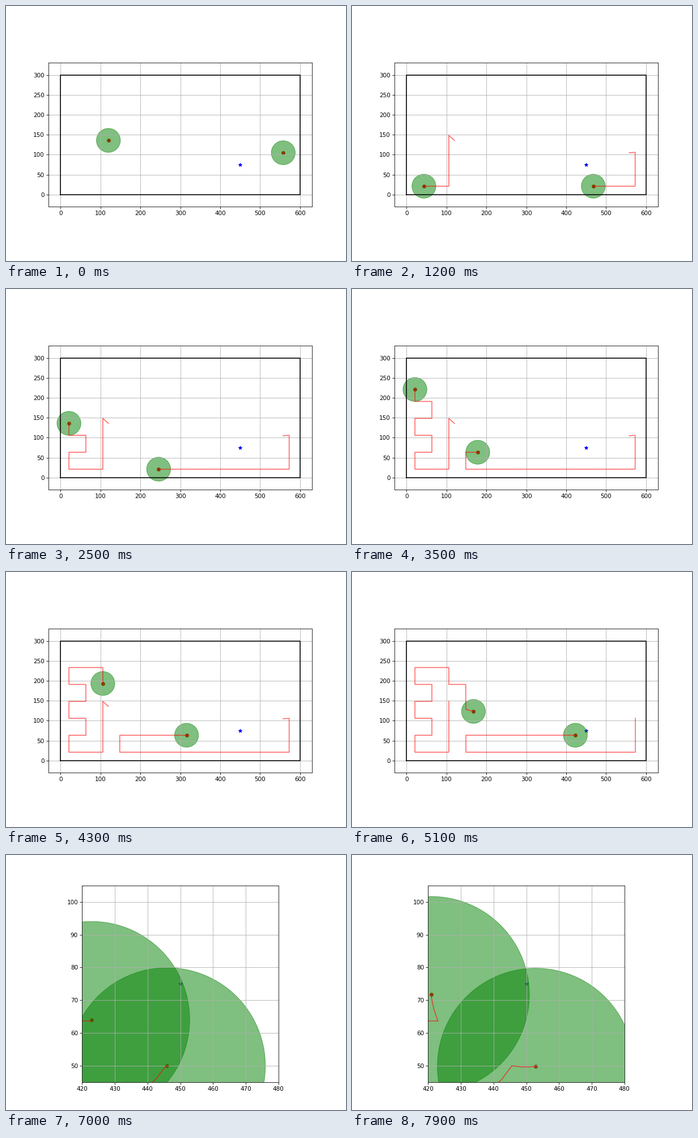
A matplotlib script for the animation above (8000 ms loop, 600 by 450 pixels).

```python
import numpy as np
import matplotlib.pyplot as plt
from matplotlib.animation import FuncAnimation
from matplotlib.patches import Circle

FRAMES, INTERVAL = 80, 100
RADIUS, STEP, TRAIL = 30, 10, 100
CELL = RADIUS * np.sqrt(2)
STAR = np.array([450.0, 75.0])
FOUND = 99        # step at which the star is sensed
ORBIT = 138       # step at which both robots start to spread around it
ZOOM_FRAME = 70
SPIN = 0.015      # radians per step


def center(i, j):
    return np.array([(i + 0.5) * CELL, (j + 0.5) * CELL])


def move_to(path, goal):
    """Append fixed-length steps, the last one cut at the goal."""
    while np.hypot(*(goal - path[-1])) > 1e-6:
        gap = goal - path[-1]
        dist = np.hypot(*gap)
        path.append(goal.copy() if dist <= STEP else path[-1] + gap / dist * STEP)


def sweep(start, corners):
    """Visit the cells one by one along the corners until the star is found."""
    path = [np.array(start, float)]
    i, j = corners[0]
    move_to(path, center(i, j))
    for ci, cj in corners[1:]:
        while (i, j) != (ci, cj):
            i += np.sign(ci - i)
            j += np.sign(cj - j)
            move_to(path, center(i, j))
    return path[:FOUND + 1]


def orbit(path, direction, last):
    """Rotate around the star."""
    x, y = path[-1] - STAR
    r, a = np.hypot(x, y), np.arctan2(y, x)
    for k in range(1, last - len(path) + 2):
        b = a + direction * SPIN * k
        path.append(STAR + r * np.array([np.cos(b), np.sin(b)]))


def approach(path, other):
    """Head straight in, then go round the waiting robot."""
    r, a0, a1 = 26.4, np.radians(182), np.radians(328.8)

    def ring(a):
        return other + r * np.array([np.cos(a), np.sin(a)])

    start, entry = path[-1], ring(a0)
    dist = np.hypot(*(entry - start))
    straight = int(dist // STEP)
    for k in range(1, straight + 1):
        path.append(start + (entry - start) * k * STEP / dist)
    n = ORBIT - len(path) + 1
    for a in np.linspace(a0, a1, n):
        path.append(ring(a))


LAST = 2 * FRAMES
left = sweep((120, 136), [(2, 3), (2, 0), (0, 0), (0, 1), (1, 1), (1, 2), (0, 2),
                          (0, 3), (1, 3), (1, 4), (0, 4), (0, 5), (2, 5), (2, 4),
                          (3, 4), (3, 2)])
right = sweep((558, 105), [(13, 2), (13, 0), (3, 0), (3, 1), (13, 1)])
approach(left, right[-1])
right += [right[-1]] * (ORBIT + 1 - len(right))
orbit(left, 1, LAST)
orbit(right, -1, LAST)
paths = [np.array(left), np.array(right)]

fig, ax = plt.subplots(figsize=(8, 6), dpi=75)
ax.set_aspect("equal")
ax.grid(True)
ax.plot([0, 600, 600, 0, 0], [0, 0, 300, 300, 0], color="black", lw=1.5)
ax.scatter(*STAR, marker="*", color="blue", s=36)
dots = ax.scatter([0, 0], [0, 0], color="red", s=30)
discs = [ax.add_patch(Circle((0, 0), RADIUS, color="green", alpha=0.5)) for _ in paths]
trails = [ax.plot([], [], color="red", alpha=0.6, lw=1.5)[0] for _ in paths]


def set_view(zoomed):
    if zoomed:
        ax.set(xlim=(420, 480), ylim=(45, 105),
               xticks=range(420, 481, 10), yticks=range(50, 101, 10))
    else:
        ax.set(xlim=(-30, 630), ylim=(-30, 330),
               xticks=range(0, 601, 100), yticks=range(0, 301, 50))


def update(frame):
    set_view(frame >= ZOOM_FRAME)
    # one step is spent on the change of mode
    head = 2 * frame if 2 * frame <= FOUND else 2 * frame - 1
    for path, disc, trail in zip(paths, discs, trails):
        disc.center = path[head]
        trail.set_data(*path[max(0, head + 1 - TRAIL):head + 1].T)
    dots.set_offsets([path[head] for path in paths])
    return [dots, *discs, *trails]


anim = FuncAnimation(fig, update, frames=FRAMES, interval=INTERVAL,
                     init_func=lambda: update(0), repeat=True, repeat_delay=0)
plt.show()
```
